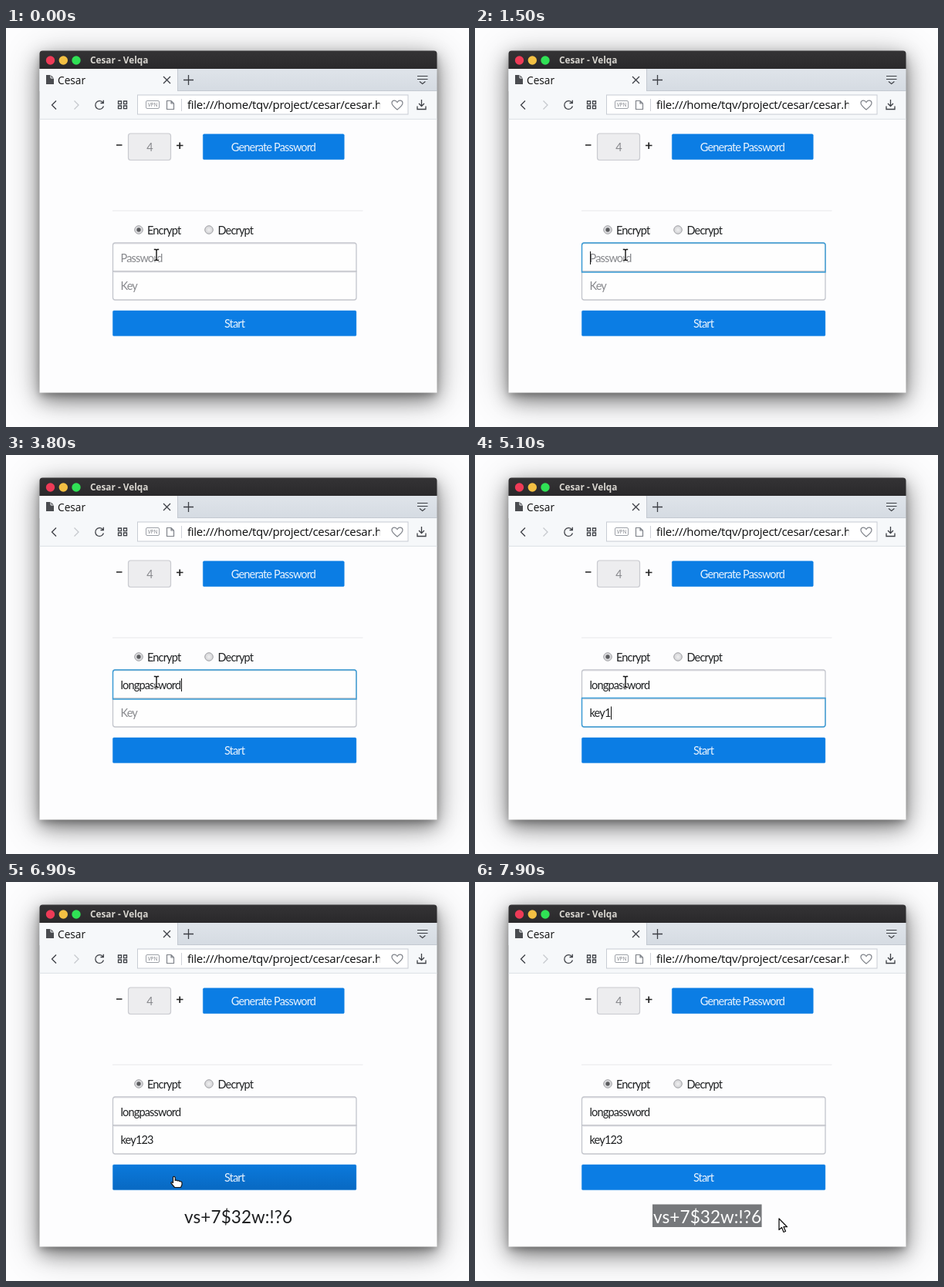
Write an HTML page that moves like this. It is 600x518 px and loops after 8 s.

```html
<!DOCTYPE html>
<html lang="en">
<head>
<meta charset="utf-8">
<title>Cesar</title>
<style>
html, body { margin: 0; width: 100%; height: 100%; overflow: hidden; background: #fdfdfe; }
.stage { position: relative; width: 600px; height: 518px; overflow: hidden; }
.shadow {
  position: absolute; left: 44px; top: 30px; width: 514px; height: 443px;
  border-radius: 4px 4px 0 0;
  box-shadow: 0 8px 48px rgba(0,0,0,.3), 0 9px 24px rgba(0,0,0,.42), 0 4px 8px rgba(0,0,0,.22);
}
svg { position: absolute; left: 0; top: 0; }
text { white-space: pre; }
.ui { font-family: "Open Sans", "Noto Sans", sans-serif; }
.page { font: 14.5px Lato, "Open Sans", sans-serif; letter-spacing: -.84px; fill: #1e2022; }
.mid { text-anchor: middle; }
.white { fill: #e9f3fd; }
.dim { fill: #87888c; }
.icon { fill: none; stroke: #3c3f45; stroke-width: 1.3; }
.btn { fill: #0b7de4; stroke: #0b7de4; stroke-opacity: .4; }
.field { fill: #fefefe; stroke: #c3c5cc; stroke-width: 1.3; }
.focus { fill: none; stroke: #3a9dd8; stroke-width: 1.4; }
.out { font: 22.5px Lato, "Open Sans", sans-serif; letter-spacing: .1px; fill: #1d1e20; }
</style>
</head>
<body>
<div class="stage">
<div class="shadow"></div>
<svg width="600" height="518" viewBox="0 0 600 518">
  <defs>
    <linearGradient id="bar" x2="0" y2="1"><stop stop-color="#343335"/><stop offset="1" stop-color="#2a292b"/></linearGradient>
    <linearGradient id="tabs" x2="0" y2="1"><stop stop-color="#dfe4ea"/><stop offset="1" stop-color="#d5dbe2"/></linearGradient>
    <linearGradient id="hover" x2="0" y2="1"><stop stop-color="#0b79dc"/><stop offset="1" stop-color="#0869c2"/></linearGradient>
    <radialGradient id="knob"><stop stop-color="#f0f0f1"/><stop offset="1" stop-color="#d2d2d5"/></radialGradient>
    <clipPath id="addr"><rect x="230" y="86" width="254.500" height="26"/></clipPath>
  </defs>

  <!-- window frame -->
  <path d="M43.500 53V33.500q0-4 4-4H554.500q4 0 4 4V53Z" fill="url(#bar)"/>
  <circle cx="57.500" cy="42" r="5.700" fill="#ee3b57"/>
  <circle cx="74.300" cy="42" r="5.700" fill="#f3c043"/>
  <circle cx="91" cy="42" r="5.700" fill="#30e155"/>
  <text class="ui" x="109" y="46" font-size="11.800" font-weight="700" fill="#d8d5cf">Cesar - Velqa</text>

  <!-- tabs -->
  <rect x="43.500" y="53" width="515" height="29" fill="url(#tabs)"/>
  <path d="M43.500 53H222V82H43.500Z" fill="#f6f8fa"/>
  <path d="M222.500 53V82M222 81.500H558" stroke="#c3c9d1" fill="none"/>
  <path d="M52 61h6l4 4v8h-10Z" fill="#4a4c50"/>
  <path d="M58 61v4h4" fill="none" stroke="#f6f8fa"/>
  <text class="ui" x="67" y="72.700" font-size="13.700" fill="#111">Cesar</text>
  <path class="icon" d="M204 63l9 9m0-9l-9 9M230 67.500h13M236.500 61v13"/>
  <path class="icon" style="stroke-width:1.100" d="M533 62.500h13.500M533 66.500h13.500M536 69.500l3.700 3 3.700-3"/>

  <!-- toolbar -->
  <rect x="43.500" y="82" width="515" height="37" fill="#f6f8fa"/>
  <path d="M43.500 118.300H558.500" stroke="#dde1e5"/>
  <rect x="170.500" y="87" width="350.500" height="25" fill="#fff" stroke="#c8ccd4"/>
  <path class="icon" d="M65 94.500l-5.500 5.500 5.500 5.500"/>
  <path class="icon" style="stroke:#c6c9ce" d="M88.500 94.500l5.500 5.500-5.500 5.500"/>
  <path class="icon" d="M125.700 97a5.400 5.400 0 1 0 .7 4.500M126.300 93.800v3.700h-3.800"/>
  <path class="icon" d="M145.500 95h4v3.700h-4zM152.500 95h4v3.700h-4zM145.500 101h4v3.700h-4zM152.500 101h4v3.700h-4z"/>
  <rect x="181.500" y="94.500" width="17" height="10" rx="1.500" fill="none" stroke="#9da1a8"/>
  <text class="ui mid" x="190" y="102.300" font-size="6.500" fill="#777b82">VPN</text>
  <path d="M208.500 94.500h5.500l3.500 3.500v7.500h-9ZM214 94.500v3.500h3.500" fill="none" stroke="#7f838a" stroke-width="1.200"/>
  <path d="M227.500 92V108" stroke="#cfd2d8"/>
  <text class="ui" x="235" y="105" font-size="15" letter-spacing="-.28" fill="#0c0d0e" clip-path="url(#addr)">file:///home/tqv/project/cesar/cesar.html</text>
  <path d="M507 106C502 102 500 100 500 97.500C500 93.500 505 93 507 96.500C509 93 514 93.500 514 97.500C514 100 512 102 507 106Z" fill="none" stroke="#7f838a" stroke-width="1.200"/>
  <path class="icon" d="M538.500 93v8M535 98l3.500 3.500 3.500-3.500M533 101.500v4h11v-4"/>

  <!-- page -->
  <rect x="43.500" y="119" width="515" height="354.500" fill="#fdfdfe"/>
  <path d="M143 152h7.500M221 152.500h8.500M225.200 148.500v8.500" stroke="#222" stroke-width="1.700"/>
  <rect x="158.500" y="137" width="55" height="34.500" rx="3" fill="#ededef" stroke="#c9cad0" stroke-width="1.200"/>
  <text class="page dim mid" x="186" y="159.500">4</text>
  <rect class="btn" x="255.300" y="137.700" width="183" height="33" rx="1.500"/>
  <text class="page white mid" x="346.500" y="159.500">Generate Password</text>
  <path d="M138 237.200H462.500" stroke="#e8e8eb"/>
  <g fill="url(#knob)" stroke="#a2a3a7"><circle cx="172" cy="262" r="5.300"/><circle cx="263" cy="262" r="5.300"/></g>
  <circle cx="172" cy="262" r="2.700" fill="#5a5b5e"/>
  <text class="page" x="183" y="268.300">Encrypt</text>
  <text class="page" x="274.500" y="268.300">Decrypt</text>
  <path class="field" d="M138.500 316V282q0-3 3-3H451q3 0 3 3V316Z"/>
  <path class="field" d="M138.500 316H454V350q0 3-3 3H141.500q-3 0-3-3Z"/>
  <path d="M140 280.500H453M140 317.500H453" stroke="#eeeef1"/>
  <path class="focus" id="focus0" d="M138.500 317V282q0-3 3-3H451q3 0 3 3V317Z"/>
  <path class="focus" id="focus1" d="M138.500 315.500H454V350q0 3-3 3H141.500q-3 0-3-3Z"/>
  <text class="page" id="text0" x="148.500" y="303.700"></text>
  <text class="page" id="text1" x="148.500" y="340"></text>
  <path id="caret" stroke="#111" d="M0 0V17"/>
  <rect class="btn" id="start" x="138.400" y="366.900" width="315.500" height="32.900" rx="1.500"/>
  <text class="page white mid" x="296" y="388.700">Start</text>
  <rect id="mark" x="230" y="418.500" height="29.500" fill="#76787b"/>
  <text class="out" id="out" x="231" y="443"><tspan id="picked" fill="#fff"></tspan><tspan id="rest"></tspan></text>

  <!-- pointers, drawn around their own centre -->
  <g id="beam" fill="none" stroke-linecap="square">
    <path d="M-2.500-7H-1L0-6L1-7H2.500M0-6V6M-2.500 7H-1L0 6L1 7H2.500" stroke="#fff" stroke-width="3.200"/>
    <path d="M-2.500-7H-1L0-6L1-7H2.500M0-6V6M-2.500 7H-1L0 6L1 7H2.500" stroke="#111" stroke-width="1.400"/>
  </g>
  <path id="hand" fill="#fff" stroke="#161616" stroke-width="1.200" stroke-linejoin="round"
    d="M-4.500-6.500Q-3-8-1.800-6V-2Q0-3 1-1.500Q2.800-2.300 4-.8Q6-1.500 7 .5V3.500L5.500 7H-2.500L-7 1.500Q-7.500-.8-4.500 1Z"/>
  <path id="arrow" fill="#fff" stroke="#161616" stroke-width="1.300" stroke-linejoin="round"
    d="M-5-9V5.500L-1.500 2.500L1 8.500L3.500 7.500L1 1.700H5.500Z"/>
</svg>
</div>
<script>
const LOOP = 8000;
const $ = id => document.getElementById(id);
const show = (id, on) => $(id).setAttribute("visibility", on ? "visible" : "hidden");

const fields = [
  { word: "longpassword", hint: "Password", from: 1300, to: 4200, caretY: 290,
    keys: [1600, 1800, 1900, 2100, 2200, 2300, 2500, 2700, 2900, 3100, 3300, 3500] },
  { word: "key123", hint: "Key", from: 4200, to: 6500, caretY: 326.5,
    keys: [4600, 4800, 4900, 5100, 5200, 5400] }
];
const result = "vs+7$32w:!?6";
const resultAt = 6600, dragAt = 7400, dragEnd = 7800;

// time, x, y of the pointer
const path = [
  [0, 195, 294.5], [5600, 195, 294.5], [6200, 221, 389.5], [7000, 221, 389.5],
  [7300, 232, 434], [7400, 232, 434], [7800, 399, 446], [LOOP, 399, 446]
];

function pointer(t) {
  const i = path.findIndex(p => p[0] > t);
  const [t0, x0, y0] = path[i - 1], [t1, x1, y1] = path[i];
  const u = (t - t0) / (t1 - t0), k = u * u * (3 - 2 * u);
  return [x0 + (x1 - x0) * k, y0 + (y1 - y0) * k];
}

// Returns whether the caret is lit in this field.
function drawField(f, i, t) {
  const typed = f.keys.filter(k => k <= t);
  const n = typed.length, active = t >= f.from && t < f.to;
  const text = $("text" + i);
  text.textContent = n ? f.word.slice(0, n) : f.hint;
  text.setAttribute("class", n ? "page" : "page dim");
  show("focus" + i, active);
  if (!active) return false;
  const since = t - (n ? typed[n - 1] : f.from);
  const x = 149 + (n ? text.getComputedTextLength() : 0);
  $("caret").setAttribute("transform", `translate(${Math.round(x) + .5} ${f.caretY})`);
  return since % 1000 < 500;
}

function draw(t) {
  show("caret", fields.map((f, i) => drawField(f, i, t)).some(Boolean));

  const [x, y] = pointer(t);
  const over = y > 367 && y < 400;
  $("start").style.fill = over ? "url(#hover)" : "";

  const onText = (y < 353 && y > 279) || (y > 418 && x < 372);
  const kind = over ? "hand" : onText ? "beam" : "arrow";
  for (const id of ["beam", "hand", "arrow"]) show(id, id === kind);
  $(kind).setAttribute("transform", `translate(${x} ${y})`);

  show("out", t >= resultAt);
  let n = 0;
  if (t >= dragEnd) n = result.length;
  else if (t >= dragAt) n = Math.max(0, Math.min(result.length, Math.round((x - 231) / 11.7)));
  $("picked").textContent = result.slice(0, n);
  $("rest").textContent = result.slice(n);
  $("mark").setAttribute("width", n ? $("picked").getComputedTextLength() + 1.5 : 0);
}

const begin = performance.now();
function tick() {
  draw((performance.now() - begin) % LOOP);
  requestAnimationFrame(tick);
}
tick();
</script>
</body>
</html>
```
